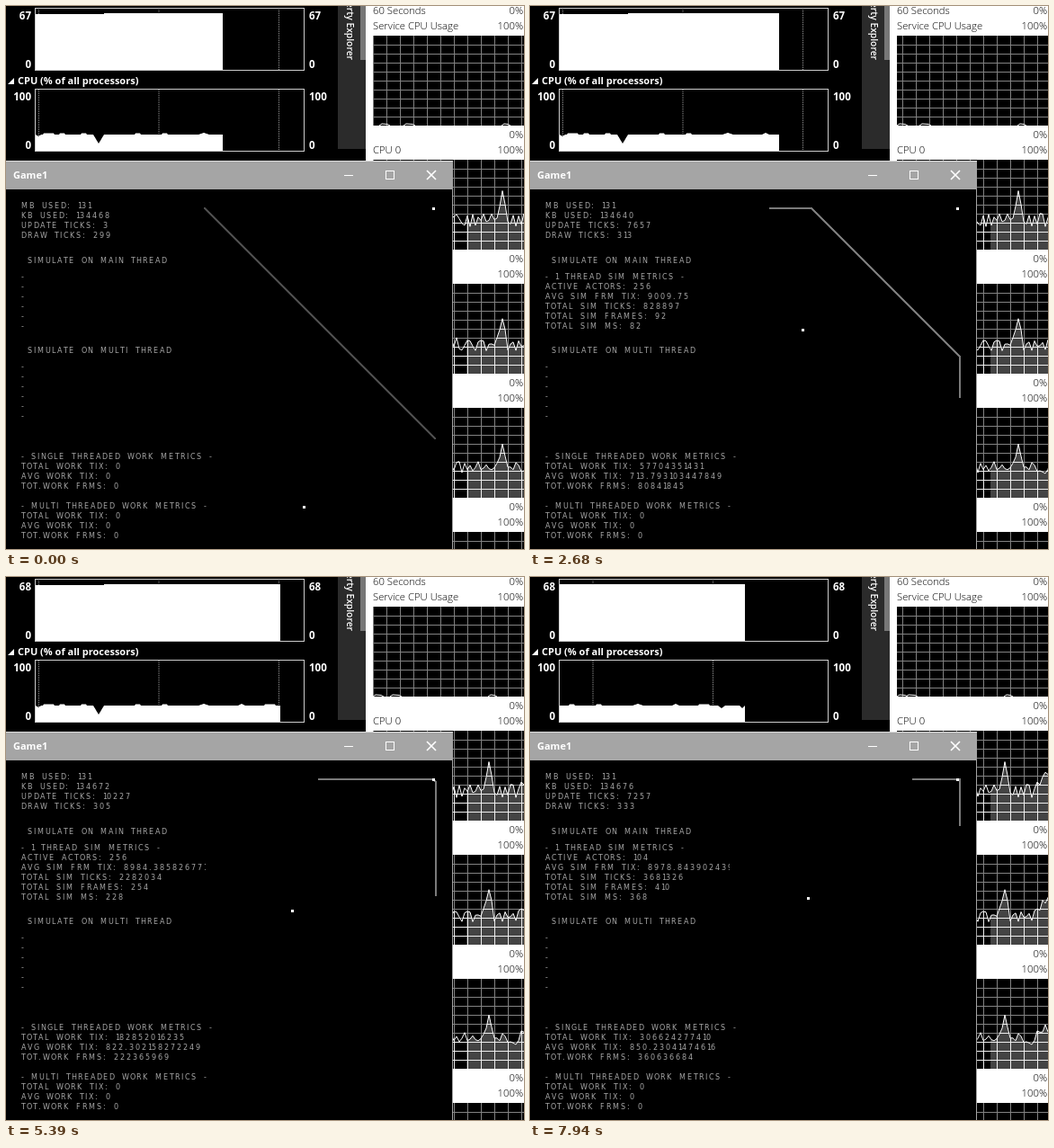
An HTML page with a canvas that plays this animation: 576 px wide and 604 px high, repeating every 8000 ms.

```html
<!DOCTYPE html>
<html lang="en">
<head>
<meta charset="utf-8">
<title>Thread simulation</title>
<style>
html, body { margin: 0; width: 100%; height: 100%; overflow: hidden; background: #000; }
canvas { display: block; }
</style>
</head>
<body>
<canvas id="stage" width="576" height="604"></canvas>
<script>
const ctx = document.getElementById('stage').getContext('2d');
const LOOP = 8000;
const REFRESHES = 78;
const STEP = LOOP / REFRESHES;
const SANS = '"Open Sans", "Noto Sans", sans-serif';

function random(seed) {
  const v = Math.sin(seed * 127.1 + 11.7) * 43758.5453;
  return v - Math.floor(v);
}

function rect(x, y, w, h, color) {
  ctx.fillStyle = color;
  ctx.fillRect(x, y, w, h);
}

function line(points, color, width = 1) {
  ctx.beginPath();
  points.forEach(([x, y]) => ctx.lineTo(x, y));
  ctx.strokeStyle = color;
  ctx.lineWidth = width;
  ctx.stroke();
}

function fillShape(points, color) {
  ctx.beginPath();
  points.forEach(([x, y]) => ctx.lineTo(x, y));
  ctx.fillStyle = color;
  ctx.fill();
}

function label(text, x, y, { size = 11, weight = 700, color = '#fff', align = 'left' } = {}) {
  ctx.font = `${weight} ${size}px ${SANS}`;
  ctx.fillStyle = color;
  ctx.textAlign = align;
  ctx.fillText(text, x, y);
}

// Wide console lettering: most characters share one advance.
const ADVANCE = { I: 4, 1: 4, '.': 5, ':': 5, '-': 4, M: 9, W: 9, T: 6, L: 6 };
function gameText(text, x, y) {
  ctx.font = '8px "DejaVu Sans", sans-serif';
  ctx.textAlign = 'left';
  ctx.fillStyle = '#a6a6a6';
  for (const c of text) {
    ctx.fillText(c, x, y);
    x += ADVANCE[c] || 7;
  }
}

function gameLines(lines, y) {
  lines.forEach((text, i) => gameText(text, 17, y + i * 11));
}

// Top of the processor area: flat, with one deep dip and small ripples.
function processorLevel(x) {
  const dip = (center, depth, width) => depth * Math.max(0, 1 - Math.abs(x - center) / width);
  const ripple = random(Math.floor(x / 6)) > .85 ? 2 : 0;
  return 143 + dip(103, 10, 6) + dip(36, 2, 3) + dip(313, 3, 4) + dip(336, 3, 3) - dip(220, 2, 6) - dip(262, 2, 4) - ripple * .7;
}

function drawAnalyzer(t) {
  const edge = Math.round(241 + t / 80 + 3 * Math.sin(2 * Math.PI * t / LOOP));
  const shift = edge >= 331 ? 100 : 0;
  const max = t < 3900 ? '67' : '68';

  rect(0, 0, 400, 172, '#000');
  ctx.setLineDash([1, 1]);
  for (let x = 36.5 - shift; x < 331; x += 133.5) {
    if (x < 33) continue;
    line([[x, 2], [x, 71]], '#999');
    line([[x, 93], [x, 161]], '#999');
  }
  ctx.setLineDash([]);

  const right = edge - shift;
  const memoryStep = 109 - shift;
  rect(33, 9, right - 33, 62, '#fff');
  rect(Math.max(33, memoryStep), 8, right - Math.max(33, memoryStep), 1, '#fff');
  const area = [[33, 161]];
  for (let x = 33; x <= right; x++) area.push([x, processorLevel(x + shift)]);
  fillShape([...area, [right, 161]], '#fff');

  ctx.strokeStyle = '#ccc';
  ctx.lineWidth = 1;
  ctx.strokeRect(32.5, 2.5, 299, 69);
  ctx.strokeRect(32.5, 92.5, 299, 69);

  for (const [text, y] of [[max, 15], ['0', 69], ['100', 105], ['0', 159]]) {
    label(text, 28, y, { size: 11.5, align: 'right' });
    label(text, 337, y, { size: 11.5 });
  }
  label('CPU (% of all processors)', 13, 87, { size: 11 });
  fillShape([[9, 80], [9, 87], [2, 87]], '#fff');

  rect(369, 0, 31, 159, '#2b2b2b');
  rect(394, 0, 6, 60, '#777');
  ctx.save();
  ctx.translate(379, 60);
  ctx.rotate(Math.PI / 2);
  label('erty Explorer', 0, 0, { size: 10.3, weight: 600, align: 'right' });
  ctx.restore();
}

function drawGrid(top, shift, color) {
  for (let y = top + 10; y < top + 100; y += 10) rect(408, y, 168, 1, color);
  for (let x = 408 + (15 - shift % 15) % 15; x < 576; x += 15) rect(x, top, 1, 100, color);
}

function cpuLoad(core, u) {
  const noise = (random(u / 3 + core * 71) - .5) * 15;
  const peak = (33 - core * 3) * Math.max(0, 1 - Math.abs(u - 552) / 6);
  const lateRise = 14 * Math.min(1, Math.max(0, (u - 583) / 9));
  return 33 + noise * (peak ? .3 : 1) + peak + lateRise;
}

function drawCore(core, top, shift) {
  const curve = [];
  for (let x = 495; x <= 579; x += 3) curve.push([x, top + 100 - cpuLoad(core, x + shift)]);
  ctx.save();
  ctx.beginPath();
  [[495, top + 100], ...curve, [579, top + 100]].forEach(([x, y]) => ctx.lineTo(x, y));
  ctx.clip();
  rect(512, top, 64, 100, '#444');
  drawGrid(top, shift, '#eee');
  ctx.restore();
  line(curve, '#fff');
}

function drawMonitor(t) {
  const shift = 3 * Math.floor((t + 500) / 1000);
  const thin = { size: 11.3, weight: 300, color: '#000' };
  const thinRight = { ...thin, align: 'right' };
  rect(400, 0, 176, 604, '#fff');
  for (let i = 0; i < 5; i++) {
    const top = 33 + i * 138;
    rect(408, top, 168, 100, '#000');
    drawGrid(top, shift, '#828282');
    label('0%', 575, top - 24, thinRight);
    label('100%', 575, top - 7, thinRight);
    if (i > 0 && i < 4) drawCore(i - 1, top, shift);
  }
  label('60 Seconds', 408, 9, thin);
  label('Service CPU Usage', 408, 26, thin);
  label('CPU 0', 408, 164, thin);

  for (const [start, length] of [[415, 12], [442, 13], [551, 10]]) {
    const x = Math.max(408, start - shift);
    line([[x, 133], [x + 3, 131], [x + length - 3, 131.5], [x + length, 133]], '#fff');
  }
}

function drawWindow() {
  rect(0, 172, 497, 432, '#a5a5a5');
  rect(0, 172, 497, 1, '#ddd');
  rect(0, 204, 496, 400, '#000');
  label('Game1', 8, 192);
  rect(376, 188, 10, 1, '#fff');
  ctx.strokeStyle = '#fff';
  ctx.lineWidth = 1;
  ctx.strokeRect(422.5, 183.5, 9, 9);
  line([[468, 183], [478, 193]], '#fff', 1.6);
  line([[478, 183], [468, 193]], '#fff', 1.6);
}

// Every actor drifts up and right at half a pixel per simulated frame until it meets the goal.
function drawActors(n) {
  const gray = Math.min(122, 76 + n / 2);
  for (let i = 0; i <= 256; i++) {
    const x = Math.min(478, 221 + i + n / 2);
    const y = Math.max(225, 225 + i - n / 2);
    rect(Math.floor(x) - 1, Math.floor(y) - 1, 2, 2, `rgb(${gray},${gray},${gray})`);
  }
  rect(474, 224, 3, 3, '#fff');
}

function drawMetrics(t, index, n) {
  const running = n > 0;
  const average = (total, count) => count ? String(+(total / count).toPrecision(15)) : '0';
  const around = (middle, spread, seed) => Math.round(middle + (random(index + seed) - .5) * spread);

  const kilobytes = 134468 + 4 * Math.round(52 * (1 - Math.exp(-t / 1500)));
  const updateTicks = running ? around(8400, 4000, 5) : 3;
  const drawTicks = index ? around(335, 70, 9) : 299;
  const simTicks = Math.round(n * around(8980, 60, 3) + random(index) * n);
  const workFrames = Math.round(n * (872000 + 9000 * random(index)));
  const workTix = Math.round(workFrames * 900 * n / (n + 24));
  const actors = Math.min(256, 2 * Math.floor((515 - n) / 2));

  gameLines(['MB USED: 131', 'KB USED: ' + kilobytes, 'UPDATE TICKS: ' + updateTicks, 'DRAW TICKS: ' + drawTicks], 225);
  gameText('SIMULATE ON MAIN THREAD', 24, 286);
  ctx.save();
  ctx.beginPath();
  ctx.rect(0, 290, 222, 80);
  ctx.clip();
  gameLines(running ? [
    '- 1 THREAD SIM METRICS -',
    'ACTIVE ACTORS: ' + actors,
    'AVG SIM FRM TIX: ' + average(simTicks, n),
    'TOTAL SIM TICKS: ' + simTicks,
    'TOTAL SIM FRAMES: ' + n,
    'TOTAL SIM MS: ' + Math.floor(simTicks / 1e4)
  ] : Array(6).fill('-'), 304);
  ctx.restore();
  gameText('SIMULATE ON MULTI THREAD', 24, 386);
  gameLines(Array(6).fill('-'), 404);

  const work = (name, tix, frames, y) => gameLines([
    `- ${name} THREADED WORK METRICS -`,
    'TOTAL WORK TIX: ' + tix,
    'AVG WORK TIX: ' + average(tix, frames),
    'TOT.WORK FRMS: ' + frames
  ], y);
  work('SINGLE', workTix, workFrames, 504);
  work('MULTI', 0, 0, 559);
}

// Pointer moves: start time, duration, x and y travelled.
const MOVES = [[100, 900, -181, -270], [1150, 350, 107, 23], [1800, 500, 46, 50], [3600, 700, 17, 15], [5200, 600, -11, -18]];
function drawCursor(t) {
  let x = 331, y = 557;
  for (const [start, duration, dx, dy] of MOVES) {
    const p = Math.min(1, Math.max(0, (t - start) / duration));
    x += dx * p;
    y += dy * p;
  }
  rect(Math.round(x) - 1, Math.round(y) - 1, 3, 3, '#fff');
}

function frame(now) {
  const index = Math.min(REFRESHES - 1, Math.floor(now % LOOP / STEP + .3));
  const t = index * STEP;
  const simFrames = Math.max(0, Math.round(6.24 * (index - 11.25)));
  drawAnalyzer(t);
  drawMonitor(t);
  drawWindow();
  drawActors(simFrames);
  drawMetrics(t, index, simFrames);
  drawCursor(t);
  requestAnimationFrame(frame);
}
requestAnimationFrame(frame);
</script>
</body>
</html>
```
